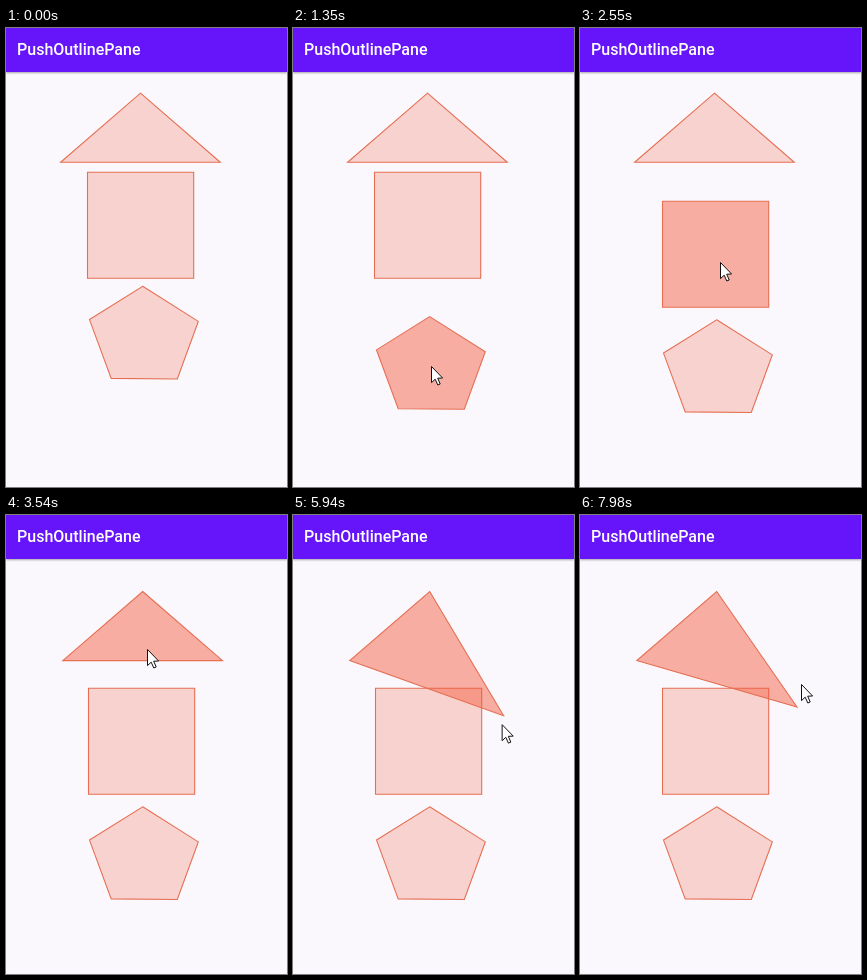
These frames come from a looping animation (281x459 px, 8 s). An HTML page:

```html
<!DOCTYPE html>
<html lang="en">
<head>
<meta charset="utf-8">
<title>Polygon dragging</title>
<style>
  html, body { margin: 0; width: 100%; height: 100%; overflow: hidden; background: #faf8fc; }
  svg { position: absolute; left: 0; top: 0; display: block; }
  header {
    position: absolute; left: 0; top: 0; width: 281px; height: 44px;
    background: #6615fb; color: #fff; box-shadow: 0 1px 2px rgba(0, 0, 0, .35);
    font: 500 16px/44px Roboto, sans-serif; text-indent: 11px; white-space: nowrap;
  }
  .shape { fill: rgb(243, 88, 58); fill-opacity: .235; stroke: #e66f53; stroke-width: 1.1; }
  .shape.held { fill-opacity: .47; }
</style>
</head>
<body>
<header>PushOutlinePane</header>
<svg width="281" height="459" viewBox="0 0 281 459">
  <polygon id="pentagon" class="shape" points="136.7,258.3 192.3,293.4 171.3,351 105.2,350.4 83.5,291.6"/>
  <polygon id="square" class="shape" points="81.5,144.3 187.7,144.3 187.7,250.3 81.5,250.3"/>
  <polygon id="triangle" class="shape"/>
  <polygon id="cursor" points=".5,.5 .5,16.6 4.2,13.2 6.8,19 9.2,18 6.7,12.2 11.6,12"
    fill="#fff" stroke="#111" stroke-width="1" stroke-linejoin="round"/>
</svg>
<script>
  const LOOP = 8000, STEP = 30;
  const $ = id => document.getElementById(id);

  const linear = p => p;
  const easeOut = p => 1 - (1 - p) ** 2;
  const easeInOut = p => (1 - Math.cos(Math.PI * p)) / 2;

  // Each key: time, x, y, easing used to arrive there
  const cursorPath = [
    [150, 258, 125], [660, 138, 304, easeInOut],
    [900, 138, 304], [1350, 138, 338, easeInOut],
    [1440, 138, 338], [1920, 138, 214, easeOut],
    [2070, 138, 214], [2430, 140, 243, easeInOut],
    [2490, 140, 243], [2550, 140, 234, linear], [2880, 142, 132, linear], [3030, 139, 123, easeOut],
    [3270, 139, 123], [3510, 141, 134, easeInOut],
    [3990, 141, 134], [4440, 209, 144, easeInOut],
    [4710, 209, 144], [4890, 212, 145, easeOut],
    [5310, 212, 145], [5340, 212, 148, linear], [6150, 208, 220.5, easeInOut],
    [7740, 208, 220.5], [7980, 221, 169, linear]
  ];
  // Shapes trail the pointer slightly
  const pentagonShift = [[990, 0, 0], [1440, 0, 33.5, easeInOut]];
  const squareShift = [[2160, 0, 0], [2520, 1, 29, easeInOut]];
  const triangleShift = [[3300, 0, 0], [3540, 2.2, 11.3, easeInOut]];
  const cornerPath = [
    [5400, 216.5, 145.6], [6240, 208.3, 222.5, easeInOut],
    [7800, 208.3, 222.5], [7980, 217, 192, linear]
  ];
  const held = {
    pentagon: [[960, 1530]],
    square: [[2130, 2640]],
    triangle: [[3330, 3840], [5400, 6690], [7800, LOOP]]
  };

  function at(path, t) {
    let prev = path[0];
    for (const key of path) {
      if (t < key[0]) {
        if (key === prev) break;
        const p = (key[3] || linear)((t - prev[0]) / (key[0] - prev[0]));
        return [1, 2].map(i => prev[i] + (key[i] - prev[i]) * p);
      }
      prev = key;
    }
    return prev.slice(1, 3);
  }

  const move = (id, pos) => $(id).setAttribute("transform", `translate(${pos})`);

  function draw(now) {
    const t = Math.floor(now % LOOP / STEP) * STEP;
    move("pentagon", at(pentagonShift, t));
    move("square", at(squareShift, t));
    move("cursor", at(cursorPath, t));
    $("cursor").style.display = t < 180 ? "none" : "";

    const [dx, dy] = at(triangleShift, t);
    const corner = t < cornerPath[0][0] ? [214.3 + dx, 134.3 + dy] : at(cornerPath, t);
    const points = [[134.5 + dx, 65.2 + dy], corner, [54.6 + dx, 134.3 + dy]];
    $("triangle").setAttribute("points", points.join(" "));

    for (const id in held) {
      $(id).classList.toggle("held", held[id].some(([from, to]) => t >= from && t < to));
    }
  }

  function tick() {
    draw(performance.now());
    requestAnimationFrame(tick);
  }
  tick();
</script>
</body>
</html>
```
